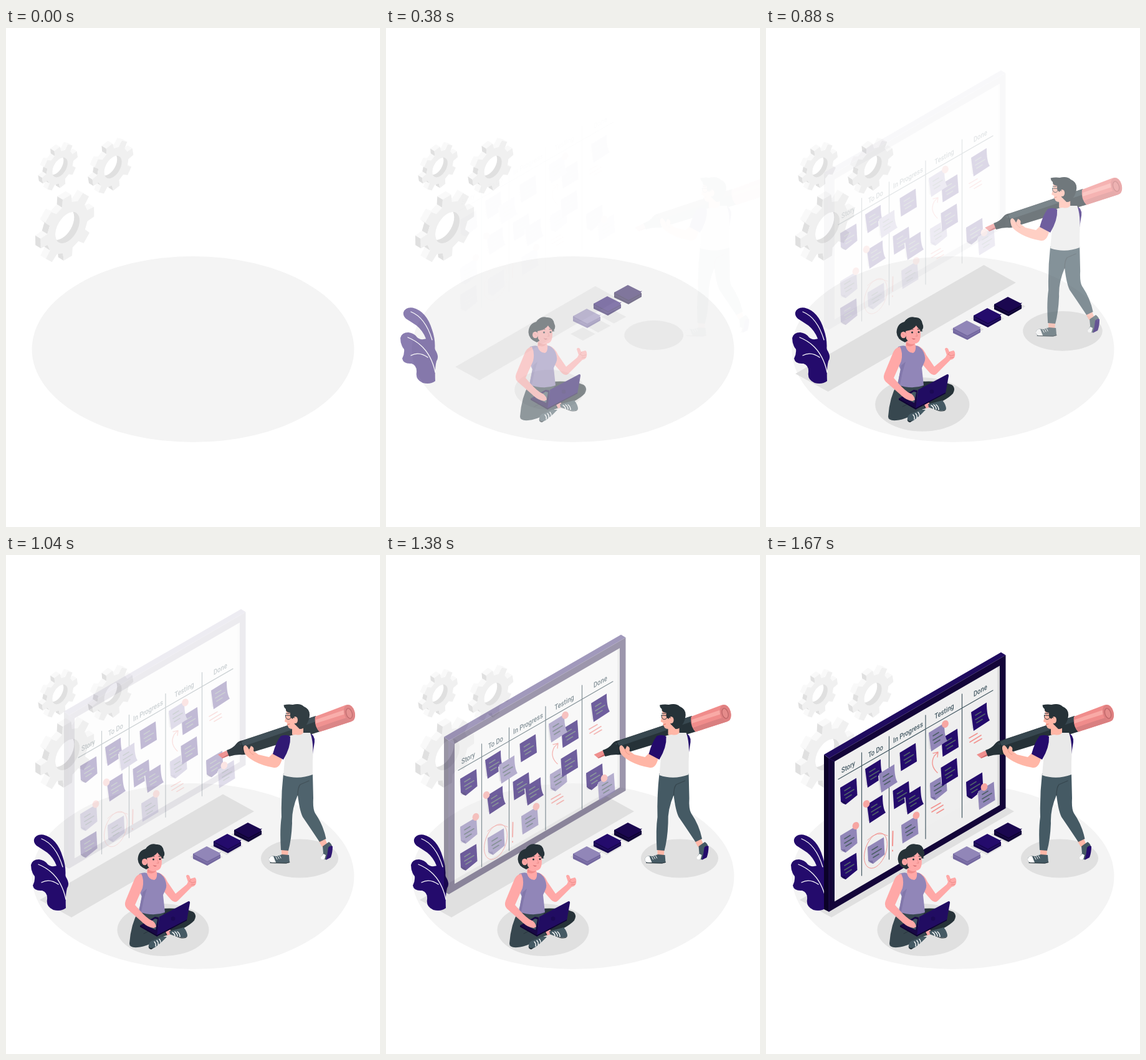
An HTML page for the animation above (1.71 s loop, 600 by 800 pixels).

```html
<!DOCTYPE html>
<html lang="en">
<head>
<meta charset="utf-8">
<title>Task board</title>
<style>
html, body { margin: 0; width: 100%; height: 100%; overflow: hidden; background: #fff; }
svg { display: block; width: 100vw; height: 100vh; }
text { font: 500 12px Roboto, sans-serif; fill: #455a64; }
.line { fill: none; stroke-linecap: round; stroke-linejoin: round; }
</style>
</head>
<body>
<svg id="stage" viewBox="0 0 600 800">
  <g id="gears"></g>
  <ellipse cx="300" cy="515" rx="258.5" ry="149" fill="#f4f4f4"/>

  <g id="shadows" fill="#e0e0e0">
    <path d="M348 383.500L398 411L105 581L54 553Z"/>
    <ellipse cx="252" cy="601" rx="73.500" ry="42"/>
    <ellipse cx="471" cy="486.500" rx="62" ry="31"/>
    <path d="M296 484L322 470L348 484L322 498ZM328 467L354 453L380 467L354 481ZM361 448L387 434L413 448L387 462Z"/>
  </g>

  <g id="plant">
    <path fill="#240b6c" d="M95 518Q87 505 81 498Q76 485 66 477Q57 471 49 466Q44 461 45 456Q48 447 60 448.500Q82 454 91 484Q97 501 95 518Z"/>
    <path fill="#240b6c" d="M40 497Q42 488 53 488Q62 489 67 496Q72 501 82 498Q92 503 96 516Q103 527 98 534Q95 545 96 566Q88 572 76 569Q64 564 66 552Q67 541 58 538Q45 539 43 530Q47 522 46 515Q40 508 40 497Z"/>
    <path class="line" stroke="#fff" stroke-width="1.300" d="M57 455Q80 464 91 500M52 496Q87 510 96 552M57 525Q70 518 84 528"/>
  </g>

  <g id="board">
    <path fill="#efefef" d="M106 329L377 172L377 403L106 561Z"/>
    <path fill="#d6d6d6" d="M371.500 178.500L376 176V402L371.500 404Z"/>
    <path fill="#0b0228" d="M93 320L101 326V572L93 568Z"/>
    <path fill="#200c60" d="M93 320L377 156L384.500 160.500L101 326Z"/>
    <path fill="#130539" fill-rule="evenodd" d="M101 326L384.500 160.500V406L101 572ZM110 331V555.500L375 401V177.500Z"/>
    <path class="line" stroke="#2b1768" stroke-width=".7" d="M101 326L110 331M101 326V572"/>
  </g>

  <g id="content">
    <path class="line" stroke="#455a64" stroke-width="1.200" d="M116 359.500L364 217M153.500 317V514M197.500 291V488M256 257V455M314.500 223V421"/>
    <g id="labels"></g>
    <g id="notes"></g>
    <g class="line" stroke="#f2938f" stroke-width="1.300">
      <ellipse cx="176" cy="474" rx="16.500" ry="29.500" transform="rotate(20 176 474)" stroke-width=".9"/>
      <path stroke-width=".9" d="M163 457Q178 441 195 450"/>
      <path d="M203.500 443L203 466M203 473.500V474.500" stroke-width="2"/>
      <path d="M275 349Q262 337 270 322L276 316M268 318L276 316L275 324"/>
      <path d="M265 406L280 397.500M266 412L284 401M274 414L285 407.500M326 293.500L339 286M327 300L345 289M334 301.500L346 294.500" stroke-width="1.700"/>
    </g>
  </g>

  <g id="books"></g>

  <g id="woman">
    <path fill="#263238" d="M248 567Q283 565 300 572Q307 577 302 586Q290 599 254 611L242 590Z"/>
    <path fill="#37474f" d="M213 570Q200 592 198 623Q198 630 211 629Q228 628 257 609Q253 600 243 597L254 573Q234 578 213 570Z"/>
    <path class="line" stroke="#263238" stroke-width=".8" d="M221 607Q232 600 248 601"/>
    <path fill="#ffa8a7" d="M256 604L263 600L267 607L259 610Z"/>
    <path fill="#455a64" d="M229 626Q229 619 238 617L250 612L258 612Q252 619 243 626Q235 633 230 631Q228 629 229 626Z"/>
    <path fill="#455a64" d="M262 603L274 600L285 597Q291 604 291 611Q286 616 276 612L263 608Z"/>
    <path fill="#263238" d="M229 627Q231 632 237 629L234 632Q229 633 229 627ZM263 608L276 612Q286 616 291 611Q289 616 279 614Z"/>
    <path class="line" stroke="#fff" stroke-width="1.400" d="M238 620Q241 623 240 627M242 618Q245 621 244 625M246 616Q248 618 248 621M267 605Q271 607 271 611M271 604Q275 607 275 611M275 604Q279 607 279 612"/>
    <path fill="#ffa8a7" d="M244 509Q254 512 259 524L272 543L290 528L292 524L289 515Q290 511 294 514L296 519L303 517Q306 519 305 526Q304 531 298 532L276 554Q271 559 265 553L252 538Z"/>
    <path class="line" stroke="#e58482" stroke-width=".8" d="M297 520L294 523L298 525M298 526L304 524M297 529L303 528"/>
    <path fill="#ffa8a7" d="M227 499L226 511L228 524H243L243 511L240 504Z"/>
    <path fill="#9186b8" d="M214 511Q222 508 226 510Q229 521 238 521Q243 519 242 509Q250 510 255 520Q259 530 256 536L252 545L255 573Q236 580 213 572L218 548L210 530Z"/>
    <path fill="#8278ab" d="M219 541L226 535L221 552L217 572L213 572Z"/>
    <path fill="#ffa8a7" d="M217 511Q208 512 204 525L192 554Q189 562 194 567L218 588Q228 598 238 598L241 595Q241 588 230 584Q220 577 207 561L219 534Q222 521 217 511Z"/>
    <path fill="#180845" d="M215 594L239 580L245 581L243 612L215 596Z"/>
    <path fill="#455a64" d="M223 593L239 583L243 584L240 601Z"/>
    <path fill="#ffa8a7" d="M218 588Q225 583 232 585Q240 588 241 596L237 598Q227 597 218 588Z"/>
    <path fill="#210c62" d="M246 580L293 555Q295.500 555 295 558L290 586L242 611.500Z"/>
    <path fill="#0e0430" d="M215 594L242 609.500L290 584.500V586L242 611.500L215 596Z"/>
    <circle cx="268" cy="583" r="3.300" fill="#1b0954"/>
    <path fill="#263238" d="M225 504Q212 499 211.500 488Q212 474 224 471Q231 461 241 464Q251 463 253 474Q256 480 252 485L254 486L248 487L240 495Z"/>
    <path fill="#ffa8a7" d="M226 486Q238 484 243 477Q246 482 249 483Q251 491 249 499Q247 506 240 506Q231 505 227 498Z"/>
    <ellipse cx="222.500" cy="492" rx="4.500" ry="5.200" fill="#ffa8a7"/>
    <path class="line" stroke="#e58482" stroke-width=".8" d="M220 490Q223 490 224 494M243 489L245 494H242"/>
    <path fill="#f08d8c" d="M227 503Q234 509 241 506Q236 513 227 509Z"/>
    <circle cx="236.500" cy="488" r="1.500" fill="#263238"/>
    <circle cx="247" cy="487.500" r="1.500" fill="#263238"/>
    <path class="line" stroke="#263238" stroke-width="1" d="M233 484Q235 482 238 483M245 483L249 483"/>
    <path fill="#b9494f" d="M235.500 497Q239 499 242 498Q239 501 235.500 497Z"/>
  </g>

  <g id="man">
    <path fill="#240b6c" d="M484 285Q494 288 493 300L490 319L484 312Z"/>
    <path fill="#ffb6a6" d="M440 472H451L450 484H440ZM500 459L510 455L514 465L505 468Z"/>
    <path fill="#455a64" d="M420 487Q421 481 432 483L441 480L452 481L453 493L447 494.500L424 494Q419 491 420 487Z"/>
    <path fill="#fff" d="M420 487Q422 482 427 483L431 493H424Q419 491 420 487Z"/>
    <path class="line" stroke="#fff" stroke-width="1" d="M431 484L433 488M434 483L436 487M437 482L439 486"/>
    <path class="line" stroke="#263238" stroke-width="1" d="M422 493.500L448 494L453 492.500"/>
    <path fill="#455a64" d="M506 467L516 460Q522 464 521 470L518 484Q513 489 506 488Q502 486 507 478Z"/>
    <path fill="#fff" d="M507 479L511 481L509 488Q503 489 503 485Z"/>
    <path fill="#240b6c" d="M515 469Q518 465 522 467Q522 477 519 485L511 489Q514 480 515 469Z"/>
    <path fill="#455a64" d="M443 350Q466 360 490 350L491 390Q490 407 494 414Q507 433 511.500 455L501 460Q485 436 474 420Q469 410 466 385Q456 408 457 430Q456 456 451 474L439 473Q437 440 440 420Q439 385 443 350Z"/>
    <path class="line" stroke="#37474f" stroke-width="1.300" d="M466 385Q466 373 470 368L484 362"/>
    <path fill="#ef8f8e" d="M338 320L352 313.500L356 321.500L345 326Z"/>
    <path fill="#c9696b" d="M345 325L355 319L356 321.500L345 326Z"/>
    <path fill="#263238" d="M352 313Q362 310 368 302Q371 298 378 297L495 258L502 283L384 319Q380 321 374 320Q365 320 356 323Z"/>
    <path fill="#37474f" d="M372 303L380 297L495 258L498 266L381 306Z"/>
    <path class="line" stroke="#1a2429" stroke-width="1" d="M374 299Q379 307 379 319"/>
    <path fill="#f08c8b" d="M494 259L543 240.500Q553 238 557 250Q560 263 552 267L501 283.500Q492 275 494 259Z"/>
    <path fill="#f9aaa6" d="M495 264L542 248V255L495 270Z"/>
    <path fill="#d97f80" d="M497 277Q521 268 544 261L552 267L501 283.500Z"/>
    <ellipse cx="549" cy="253.500" rx="8.500" ry="13.700" transform="rotate(-17 549 253.500)" fill="#df8081"/>
    <ellipse cx="548.500" cy="254" rx="4.700" ry="8.300" transform="rotate(-17 548.500 254)" fill="#e58b8a" stroke="#bd6567" stroke-width="1.300"/>
    <path fill="#ffb6a6" d="M457 270L475 268L475 288Q467 294 457 288Z"/>
    <path fill="#ffb6a6" d="M428 316L441 327Q437 342 428 341Q410 338 397 331Q381 322 380 315Q377 306 382 305Q385 306 388 312L391 306Q397 308 395 314L403 320L420 324Z"/>
    <path class="line" stroke="#e99584" stroke-width=".8" d="M388 312Q389 318 395 320"/>
    <path fill="#e9e9e9" d="M450 291Q458 288 463 288Q471 290 475 285H486Q492 300 490 330V352Q466 361 443 353L446 318Z"/>
    <path fill="#240b6c" d="M439 290Q449 287 454 291Q455 308 443 328L426 319Q431 300 439 290Z"/>
    <path fill="#ffb6a6" d="M447 249Q449 256 447 259L445 267L449 269Q449 279 458 279L469 277L470 254Z"/>
    <path fill="#263238" d="M443.500 240.500Q451 239 458 240Q470 237 476 243Q486 247 485 258Q484 267 479 273Q476 279 469 279L461 271L459 263Q453 262 454 253Q446 252 447 247Q444 245 443.500 240.500Z"/>
    <ellipse cx="462" cy="264.500" rx="4" ry="5.500" fill="#ffb6a6"/>
    <path class="line" stroke="#263238" stroke-width="1" d="M446.500 257L455 257.500Q456 263 451 263.500Q446 263 446.500 257ZM455 259L461 261M447 254L453 254"/>
    <path class="line" stroke="#e0705f" stroke-width="1" d="M449 272L453 271"/>
  </g>
</svg>

<script>
const $ = id => document.getElementById(id);
const path = (d, fill) => `<path d="${d}" fill="${fill}"/>`;
const poly = (pts, fill) => path('M' + pts.map(p => p.map(v => v.toFixed(2)).join(' ')).join('L') + 'Z', fill);
const DARK = '#240b6c', LIGHT = '#9186b8';

// Gear on the isometric wall: radius r, hole h, tooth phase in degrees, depth d
function gear(cx, cy, r, h, phase, d, id) {
  const dx = -.866 * d, dy = -.54 * d, flat = [];
  for (let k = 0; k < 8; k++)
    for (const [a, q] of [[-13.5, .76], [-9, 1], [9, 1], [13.5, .76]]) {
      const w = (phase + 45 * k + a) * Math.PI / 180;
      flat.push([Math.cos(w) * r * q, Math.sin(w) * r * q]);
    }
  const pts = flat.map(([u, v]) => [cx + .866 * u, cy + v - .5 * u]);
  let out = '';
  pts.forEach((p, i) => {
    const j = (i + 1) % pts.length, q = pts[j];
    if ((q[1] - p[1]) * dx - (q[0] - p[0]) * dy <= 0) return;
    const up = flat[j][0] - flat[i][0];
    out += poly([p, q, [q[0] + dx, q[1] + dy], [p[0] + dx, p[1] + dy]], up > r * .1 ? '#f9f9f9' : '#e0e0e0');
  });
  const disc = (x, y, fill, extra = '') =>
    `<circle r="${h}" transform="matrix(.866 -.5 0 1 ${x} ${y})" fill="${fill}" ${extra}/>`;
  return out + poly(pts, '#f0f0f0') + disc(cx, cy, '#e0e0e0') +
    `<clipPath id="${id}">${disc(cx, cy, '#000')}</clipPath>` +
    `<g clip-path="url(#${id})">${disc(cx + dx, cy + dy, '#fff')}</g>`;
}
$('gears').innerHTML = gear(86.5, 223.5, 33, 14.2, -9, 7.5, 'h1') +
  gear(171.5, 223, 38, 16.3, -10, 8.5, 'h2') + gear(98.5, 320, 50, 22.5, -1, 10, 'h3');

$('labels').innerHTML = [['Story', 121, 350], ['To Do', 164, 325.5], ['In Progress', 204, 302],
  ['Testing', 270.5, 263.5], ['Done', 333, 227.5]]
  .map(([s, x, y]) => `<text transform="matrix(.78 -.45 0 1 ${x} ${y})">${s}</text>`).join('');

// Sticky notes: plain, curled at the left, curled at the right
const shapes = {
  p: 'M0 0L25.500 -15.500L27.500 14L2 29.500Z',
  l: 'M0 0L26 -15.500L27.500 12L9 27Q4 26 1 22Z',
  r: 'M0 0L25 -15.500Q25 6 30 13L4 30Z'
};
const note = ([kind, x, y, light]) => `<g transform="translate(${x} ${y})">` +
  path('M-1 3L3 0L6 26L1 26Z', '#dedee1') +
  path(shapes[kind], light ? LIGHT : DARK) +
  (kind == 'l' ? path('M1 22L9 27L8 22Z', light ? '#776ca3' : '#180650') : '') +
  '<path class="line" stroke="#4f6069" stroke-width="1.700" d="M7 5L16 -.5M7 12L22 3M9 17L18 11.500"/></g>';
const tape = ([x, y]) =>
  `<ellipse cx="${x}" cy="${y}" rx="5.200" ry="6.200" transform="rotate(25 ${x} ${y})" fill="#f7a6a2"/>`;
$('notes').innerHTML = [
  ['l', 119, 373], ['l', 119, 450, 1], ['l', 119, 493],
  ['r', 159, 343], ['r', 181, 351, 1], ['r', 162, 400], ['l', 163, 468, 1],
  ['p', 214.5, 317], ['p', 203.5, 378], ['r', 223, 386], ['p', 217, 433, 1],
  ['p', 281.5, 294], ['r', 261, 285, 1], ['l', 263, 366, 1], ['p', 280.5, 341],
  ['r', 329, 252], ['l', 321, 364], ['p', 340, 379, 1]
].map(note).join('') +
  [[144, 434], [161, 399], [241, 417.5], [287.5, 271], [350, 372]].map(tape).join('');

const book = ([x, y, top, side, edge]) => `<g transform="translate(${x} ${y})">` +
  path('M-22 12L1 3L22 13V19L1 31L-22 20Z', side) +
  path('M-22 12L0 0L20 10L23 9.500L20 12.500L22 13L1 24Z', top) +
  `<path class="line" stroke="${edge}" stroke-width=".8" d="M-22 15L1 27L22 16"/></g>`;
$('books').innerHTML = [[322, 467, LIGHT, '#7468a0', '#8c81b4'], [355, 447, DARK, '#180650', '#34207c'],
  [388, 429, '#1b0750', '#0e0233', '#2a1560']].map(book).join('');

// Cubic Bezier easing solved by bisection
function bezier(x1, y1, x2, y2) {
  const at = (s, a, b) => 3 * (1 - s) * (1 - s) * s * a + 3 * (1 - s) * s * s * b + s * s * s;
  return x => {
    if (x <= 0) return 0;
    if (x >= 1) return 1;
    let lo = 0, hi = 1;
    for (let i = 0; i < 30; i++) {
      const m = (lo + hi) / 2;
      at(m, x1, x2) < x ? lo = m : hi = m;
    }
    return at(lo, y1, y2);
  };
}
const back = bezier(.36, -.01, .5, 1.38), drop = bezier(.42, 0, .85, .95);

function pose(id, alpha, transform) {
  const el = $(id);
  el.setAttribute('opacity', Math.max(0, Math.min(1, alpha)).toFixed(4));
  el.setAttribute('transform', transform);
}
const move = (x, y) => `translate(${x.toFixed(2)} ${y.toFixed(2)})`;

const LOOP = 1710, FPS = 24;
function draw(ms) {
  const step = Math.min(40, Math.floor((ms % LOOP + 4) * FPS / 1000));
  const t = step < 3 ? 0 : (step + .5) / FPS;
  const p = back(t), m = back((t - .085) / 1.5), b = drop(t / 1.69);
  const off = 36 * (1 - p), s = .5 + .5 * p;
  pose('shadows', p, `translate(296 512) scale(${s.toFixed(4)}) translate(-296 -512)`);
  pose('plant', p, move(-off, 0));
  pose('woman', p, move(off, 0));
  pose('books', p, move(0, -off));
  pose('man', m > 0 ? m ** 2.1 : 0, move(72 * (1 - m), 0));
  pose('content', b ** 2, move(0, -72 * (1 - b)));
  pose('board', b ** 4, move(0, -144 * (1 - b)));
}

let start;
function tick(now) {
  start ??= now;
  draw(now - start);
  requestAnimationFrame(tick);
}
draw(0);
requestAnimationFrame(tick);
</script>
</body>
</html>
```
